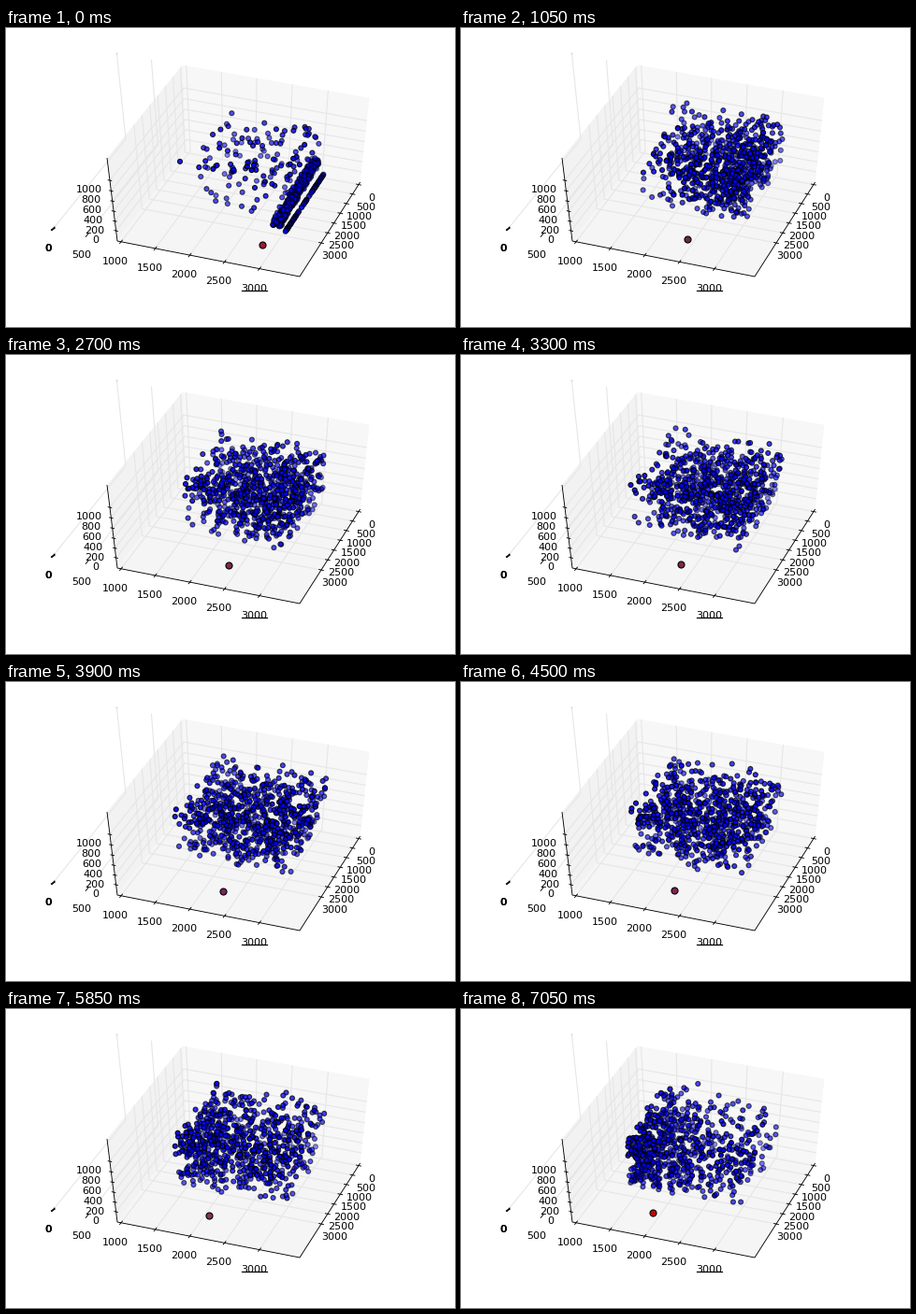
Recreate the animation shown at these times as a matplotlib script. Size 480 by 320 pixels, loop 7.2 s.

```python
import numpy as np
import matplotlib.pyplot as plt
from matplotlib.animation import FuncAnimation

FRAMES, STEP = 48, 150
SPREAD_STEPS = 7
N_BAND, N_FREE = 630, 150
N = N_BAND + N_FREE

plt.rcParams["font.family"] = "DejaVu Sans"
fig = plt.figure(figsize=(6, 4), dpi=80, facecolor="white")
ax = fig.add_axes([0, 0, 1, 1])
ax.set_xlim(0, 480)
ax.set_ylim(320, 0)
ax.axis("off")

# Perspective of the unit box: front left corner, vanishing points, weights.
ORIGIN = np.array([119.0, 228.0])
VANISH = np.array([[-10476, -1837], [1477, -1551], [253.3, 1314]])
WEIGHT = np.array([-0.01807, 0.0578, -0.0757])


def depth(p):
    return 1 + p @ WEIGHT


def project(p):
    p = np.asarray(p, float)
    return (ORIGIN + (p * WEIGHT) @ VANISH) / depth(p)[..., None]


# Data values to box coordinates
def box_x(v):
    return 0.0209 + 0.3809 * (v - 1000) / 1000


def box_y(v):
    return 0.973 - 0.21 * v / 1000


def box_z(v):
    return 0.132 + 0.613 * v / 1000


def path(corners, color, lw, z):
    ax.plot(*project(corners).T, color=color, lw=lw, zorder=z,
            solid_capstyle="butt")


def pane(corners, shade):
    ax.fill(*project(corners).T, color=str(shade), lw=0, zorder=0)


def tick(corner, across, shift, text):
    x, y = project(corner)
    dx, dy = across
    ax.plot([x - dx, x + dx], [y - dy, y + dy], color="black", lw=0.8, zorder=3)
    ax.text(x + shift[0], y + shift[1], text, size=10,
            ha="center", va="center_baseline", zorder=3)


def draw_box():
    pane([(0, 0, 0), (0, 1, 0), (0, 1, 1), (0, 0, 1)], 0.95)
    pane([(0, 1, 0), (1, 1, 0), (1, 1, 1), (0, 1, 1)], 0.97)
    pane([(0, 0, 0), (1, 0, 0), (1, 1, 0), (0, 1, 0)], 0.9605)

    for v in range(0, 3001, 500):
        a, b = box_x(v), box_y(v)
        path([(a, 0, 0), (a, 1, 0), (a, 1, 1)], "0.9", 1, 1)
        path([(1, b, 0), (0, b, 0), (0, b, 1)], "0.9", 1, 1)
        tick((a, 0, 0), (1.4, -1.7), (-6, 20), str(v))
        tick((1, b, 0), (2.4, 0.5), (14, 13), str(v))
    for v in range(0, 1001, 200):
        c = box_z(v)
        path([(0, 0, c), (0, 1, c), (1, 1, c)], "0.9", 1, 1)
        tick((0, 0, c), (1.8, 0.4), (-22, 9), str(v))

    path([(0, 0, 1), (0, 0, 0), (1, 0, 0), (1, 1, 0)], "black", 0.8, 2)

    # Stacked leftovers on the first and last labels
    x, y = project((box_x(0), 0, 0))
    ax.plot([x - 1.6, x + 1.2], [y + 1.4, y - 0.6], color="black", lw=1.6, zorder=3)
    ax.text(x - 5, y + 20, "0", size=10, weight="bold",
            ha="center", va="center_baseline", zorder=3)
    for k in range(4):
        ax.plot([251.5 + 7 * k, 257.5 + 7 * k], [281.4] * 2,
                color="black", lw=1.1, zorder=3)
    ax.plot(*project((box_x(0), 1, 1)), "o", color="0.85", ms=1.8, mew=0, zorder=1)


draw_box()

# Cloud: each point keeps a rank per axis, and the ranks wander slowly.
rng = np.random.default_rng(11)
rank = np.column_stack([rng.random(N), rng.beta(1.25, 1.25, N),
                        rng.beta(1.25, 1.25, N)])
rate = rng.uniform(0.1, 0.45, (N, 3))
phase = rng.uniform(0, 2 * np.pi, (N, 3))
LOW = np.array([0.19, 0.343, 0.132])
SPAN = np.array([0.62, 0.63, 0.613])

# The band lies along y: a thick strip and a thin one beside it.
along = rng.random(N_BAND)
thin = rng.random(N_BAND) < 0.2
band = np.column_stack([
    np.where(thin, 0.80, rng.uniform(0.73, 0.775, N_BAND)),
    0.343 + 0.63 * along,
    np.where(thin, 0.05, 0.09 + 0.08 * rng.random(N_BAND) + 0.07 * along),
])

KEYS = [0, 7, 18, 26, 34, 39, 47]
SKEW_X = [0.7, 0.55, 0.68, 0.85, 1.05, 1.3, 2.1]
SKEW_YZ = [1, 1, 1, 1, 1.05, 1.1, 1.4]
RED_X = [274, 242, 238, 232, 223, 217, 205]
RED_FILL = ["#9b1b30", "#762150", "#7d2846", "#82215a",
            "#e60000", "#803750", "#c80000"]


def cloud(n):
    q = rank + 0.07 * (np.sin(rate * n + phase) - np.sin(phase))
    q = 1 - np.abs(1 - np.abs(q))
    sx, s = np.interp(n, KEYS, SKEW_X), np.interp(n, KEYS, SKEW_YZ)
    p = LOW + SPAN * q ** np.array([sx, s, s])
    k = 1 - (1 - min(n / SPREAD_STEPS, 1)) ** 1.5
    p[:N_BAND] = band + (p[:N_BAND] - band) * k
    return p


dots = ax.scatter(np.zeros(N), np.zeros(N), s=20, lw=1, zorder=4)
red = ax.scatter([0], [0], s=40, lw=1, edgecolors="black", zorder=5)


def update(n):
    p = cloud(n)
    d = depth(p)
    order = np.argsort(-d)
    d = d[order]
    fill = np.zeros((N, 4))
    fill[:, 3] = 1 - 0.6 * (d - d.min()) / (d.max() - d.min())
    edge = fill.copy()
    fill[:, 2] = 1
    dots.set_offsets(project(p[order]))
    dots.set_facecolors(fill)
    dots.set_edgecolors(edge)

    x = np.interp(n, KEYS, RED_X)
    red.set_offsets([[x, 232 - 0.2 * (274 - x)]])
    red.set_facecolor(RED_FILL[int(np.argmin(np.abs(np.array(KEYS) - n)))])
    return dots, red


anim = FuncAnimation(fig, update, frames=FRAMES, interval=STEP,
                     repeat=True, repeat_delay=0, blit=False)
plt.show()
```
